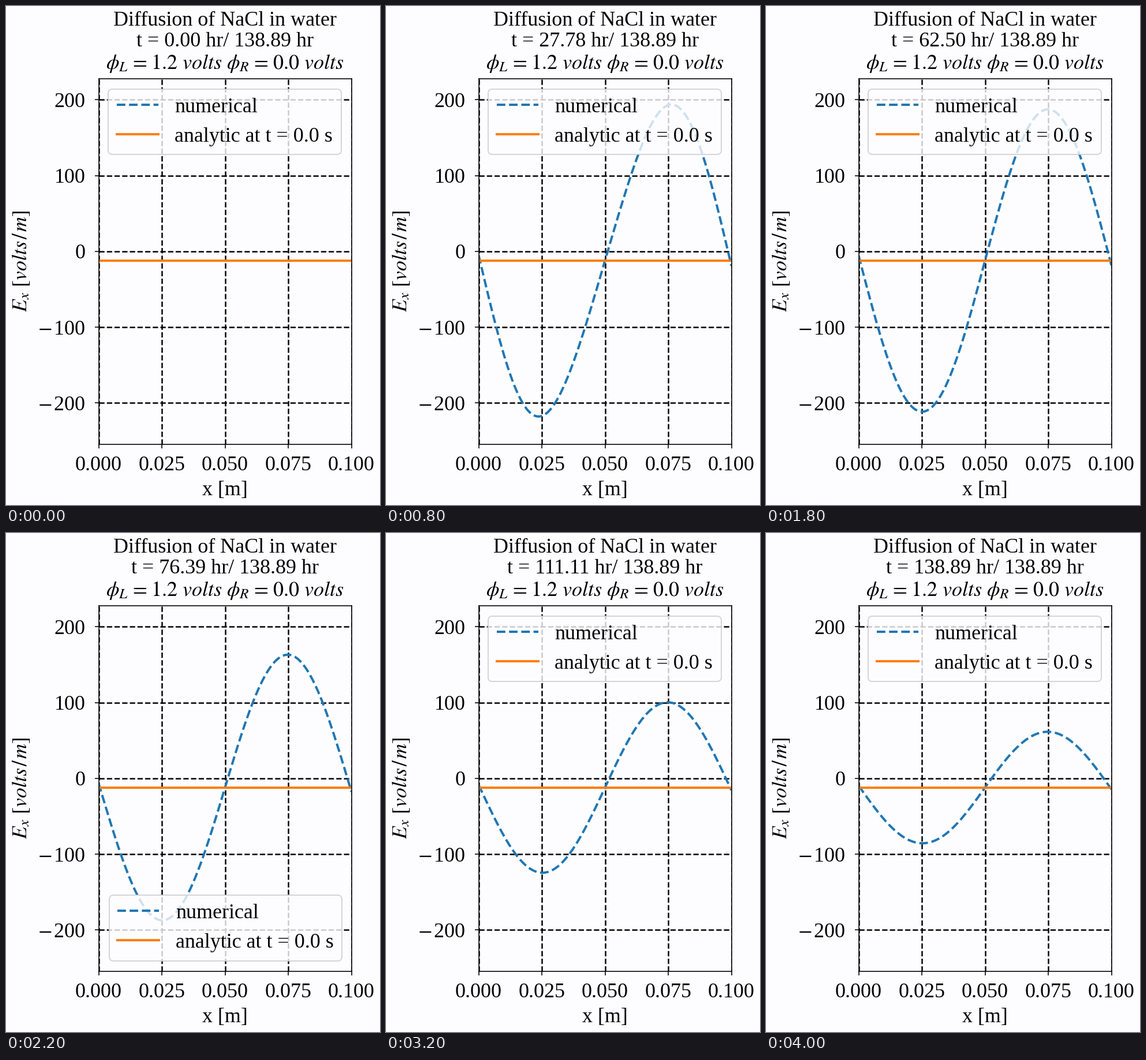
Animation, 648 px wide and 864 px high, one loop 4.2 s. Source, as a matplotlib script:

```python
import numpy as np
import matplotlib.pyplot as plt
from matplotlib.animation import FuncAnimation

WIDTH, HEIGHT, DPI = 648, 864, 144
FRAMES, INTERVAL = 21, 200
TOTAL_TIME = 500_000            # seconds
LENGTH = 0.1                    # metres
PHI_L, PHI_R = 1.2, 0.0
E_MEAN = -(PHI_L - PHI_R) / LENGTH
D_NA, D_CL = 1.33e-9, 2.03e-9   # diffusion constants, m^2/s
PERIOD = 0.099                  # effective length of the cell grid
PLATEAU = 0.56                  # share of the cell filled with salt at first
SCALE = 1417                    # volts/m
PAPER = "#fdfdff"
GAP = r"\hspace{0.11}"          # widens mathtext spacing to that of TeX

plt.rcParams.update({
    "font.family": "Liberation Serif",
    "font.size": 18,
    "axes.labelsize": 18,
    "legend.fontsize": 18,
    "mathtext.fontset": "stix",
    "figure.facecolor": PAPER,
    "axes.facecolor": PAPER,
})

x = np.linspace(0, LENGTH, 100)


def field(t):
    """Field left by the faster ion running ahead of the slower one."""
    k = 2 * np.pi / PERIOD
    total = np.zeros_like(x)
    for n in range(1, 16):
        weight = ((-1) ** n * np.sin(np.pi * n * PLATEAU)
                  / (n ** 2 * np.sin(np.pi * PLATEAU)))
        decay = np.exp(-D_NA * (n * k) ** 2 * t) - np.exp(-D_CL * (n * k) ** 2 * t)
        total += weight * decay * np.sin(n * k * (x - (LENGTH - PERIOD) / 2))
    return E_MEAN + SCALE * total


def hours(t):
    return f"{t / 3600:.2f} hr"


def title_line(baseline, text=""):
    return fig.text(379.5 / WIDTH, 1 - baseline / HEIGHT, text,
                    ha="center", va="baseline")


times = np.linspace(0, TOTAL_TIME, FRAMES)
fields = [field(t) for t in times]

fig = plt.figure(figsize=(WIDTH / DPI, HEIGHT / DPI), dpi=DPI)
ax = fig.add_axes([160.5 / WIDTH, 105.5 / HEIGHT, 438 / WIDTH, 632.5 / HEIGHT])
numerical, = ax.plot(x, fields[0], "--", color="#1f77b4", lw=2, label="numerical")
ax.plot(x, np.full_like(x, E_MEAN), color="#ff7f0e", lw=2,
        label="analytic at t = 0.0 s")

ax.set_xlim(0, LENGTH)
ax.set_ylim(1.1 * np.min(fields), 1.1 * np.max(fields))
ax.set_xticks(np.linspace(0, LENGTH, 5))
ax.xaxis.set_major_formatter("{x:.3f}")
levels = range(-200, 201, 100)
ax.set_yticks(levels, [(f"$-{GAP}$" if v < 0 else "") + str(abs(v)) for v in levels])
ax.tick_params(axis="x", pad=7)
ax.tick_params(axis="y", pad=8)
ax.grid(color="black", ls="--", lw=1.25)
ax.set_xlabel("x [m]", labelpad=5)
ax.set_ylabel(rf"$E_x\ [volts{GAP}/{GAP}m]$", labelpad=5.5)

equals = f"{GAP}={GAP}"
title_line(33.5, "Diffusion of NaCl in water")
clock = title_line(70.5)
title_line(108.5, rf"$\phi_L{equals}{PHI_L}\ volts\ \phi_R{equals}{PHI_R}\ volts$")


def update(i):
    numerical.set_ydata(fields[i])
    clock.set_text(f"t = {hours(times[i])}/ {hours(TOTAL_TIME)}")
    # The legend moves down while the crest only just reaches it.
    peak = np.max(np.abs(fields[i] - E_MEAN))
    ax.legend(loc="lower left" if 140 < peak < 180 else "upper right")


anim = FuncAnimation(fig, update, frames=FRAMES, init_func=lambda: update(0),
                     interval=INTERVAL, repeat=True, repeat_delay=0)
plt.show()
```
